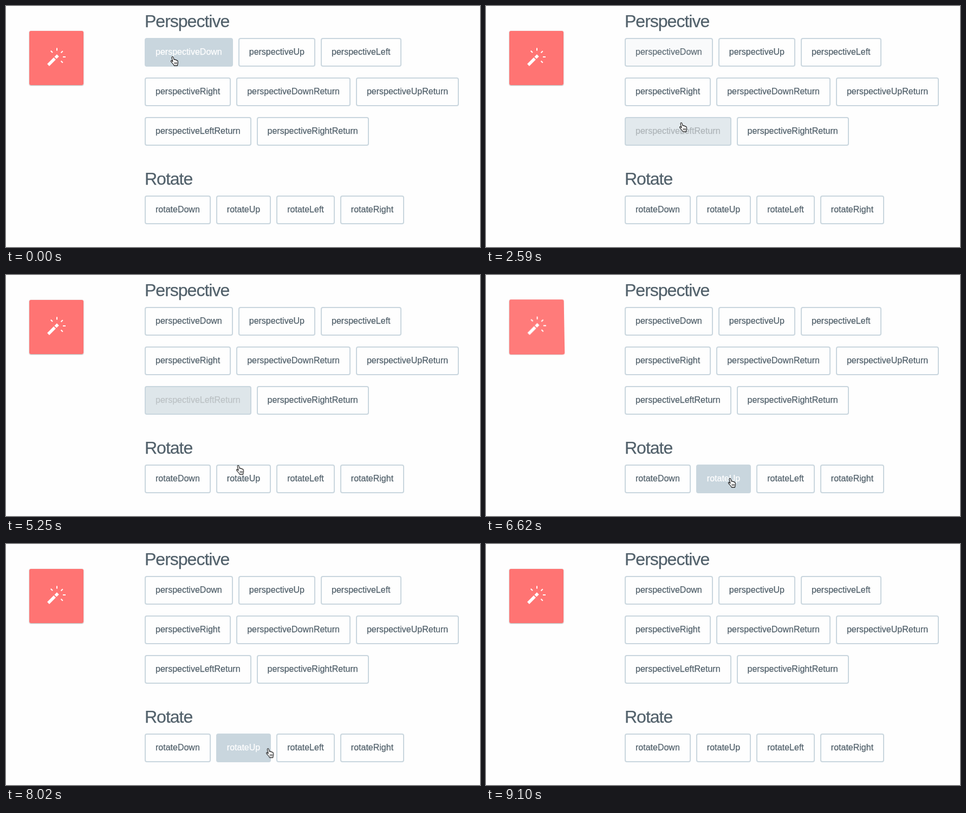
Write an HTML page that moves like this. It is 875x445 px and loops after 9880 ms.

```html
<!DOCTYPE html>
<html lang="en">
<head>
<meta charset="utf-8">
<title>CSS animation effects</title>
<style>
  :root { --loop: 9880ms; --ink: #52616b; --line: #c9d6de; --paper: #fefefe; }
  html, body { margin: 0; width: 100%; height: 100%; overflow: hidden; background: var(--paper); }
  #stage {
    position: relative; width: 875px; height: 445px; overflow: hidden;
    font-family: "Liberation Sans", Arial, Helvetica, sans-serif;
    color: var(--ink); -webkit-text-stroke: .25px;
  }
  #stage > * { position: absolute; }

  h2 { left: 256px; margin: 0; font-size: 32px; line-height: 32px; font-weight: 400; letter-spacing: -1px; }
  .row { left: 256px; display: flex; gap: 10px; }
  .row span {
    box-sizing: border-box; height: 53px; padding: 0 18px;
    border: 2px solid var(--line); border-radius: 4px;
    font-size: 16px; line-height: 47px; white-space: nowrap;
  }

  #slot {
    left: 43px; top: 46px; width: 100px; height: 100px; border-radius: 3px;
    box-shadow: 0 0 2px rgba(0, 0, 0, .14), 0 1px 2px rgba(0, 0, 0, .28);
  }
  #tile { height: 100%; border-radius: 3px; background: #ff7473; animation: tile var(--loop) infinite; }
  #tile svg { display: block; fill: none; stroke: #fff; stroke-width: 2; }
  #hand { left: 0; top: 0; animation: hand var(--loop) linear infinite; }

  .row [id] { animation: var(--loop) infinite; }
  #down { animation-name: down; }
  #leftReturn { animation-name: leftReturn; }
  #rotUp { animation-name: rotUp; }
  #rotLeft { animation-name: rotLeft; }
  #rotRight { animation-name: rotRight; }

  /* perspectiveDown, perspectiveLeftReturn, then rotateUp: one second each */
  @keyframes tile {
    0%, 5.2% { transform-origin: 0 100%; transform: perspective(800px) rotateX(0deg); animation-timing-function: ease; }
    15.3%, 20.34% { transform-origin: 0 100%; transform: perspective(800px) rotateX(-180deg); }
    20.341%, 32.1% { transform-origin: 0 0; transform: none; }
    32.101% { transform-origin: 0 0; transform: perspective(800px) rotateY(-180deg); animation-timing-function: ease; }
    42.2% { transform-origin: 0 0; transform: perspective(800px) rotateY(0deg); }
    66.37% {
      opacity: 1; transform-origin: 0 0;
      transform: perspective(800px) rotateX(0deg) translateZ(0px); animation-timing-function: ease;
    }
    76.5%, 81.16% {
      opacity: 0; transform-origin: 50% 0;
      transform: perspective(800px) rotateX(180deg) translateZ(100px);
    }
    81.17%, 100% { opacity: 1; transform-origin: 0 0; transform: none; }
  }

  @keyframes down {
    0%, 24.3% { background: var(--line); color: #fff; }
    27.3%, 100% { background: var(--paper); color: var(--ink); }
  }
  @keyframes leftReturn {
    0%, 25.3%, 55.5%, 100% { background: var(--paper); color: var(--ink); }
    28.3%, 52.4% { background: var(--line); color: #fff; }
  }
  @keyframes rotUp {
    0%, 53.2%, 84.7%, 100% { background: var(--paper); color: var(--ink); }
    56.3%, 81.7% { background: var(--line); color: #fff; }
  }
  @keyframes rotLeft {
    0%, 82.1%, 88%, 100% { background: var(--paper); color: var(--ink); }
    85%, 85.1% { background: var(--line); color: #fff; }
  }
  @keyframes rotRight {
    0%, 85.3%, 92.1%, 100% { background: var(--paper); color: var(--ink); }
    88.4%, 89.1% { background: var(--line); color: #fff; }
  }

  @keyframes hand {
    0%, 23.7% { transform: translate(302px, 92px); }
    26.7%, 50.8% { transform: translate(365px, 237px); }
    53.14% { transform: translate(423px, 350px); }
    55.2%, 77.9% { transform: translate(445px, 374px); }
    81.1% { transform: translate(476px, 376px); }
    89% { transform: translate(690px, 397px); }
    91.8%, 100% { transform: translate(737px, 446px); }
  }
</style>
</head>
<body>
<div id="stage">
  <div id="slot">
    <div id="tile">
      <svg width="100" height="100">
        <path stroke-width="5.5" d="M35 63L47 51M48.4 49.6L52.8 45.2"/>
        <path d="M51 36.5V31.5M62 48H67M58.5 40.5L61.8 37.2M43 40L39.7 36.7M58.5 55.5L61.8 58.8"/>
      </svg>
    </div>
  </div>

  <h2 style="top:12px">Perspective</h2>
  <div class="row" style="top:59px">
    <span id="down">perspectiveDown</span><span>perspectiveUp</span><span>perspectiveLeft</span>
  </div>
  <div class="row" style="top:132px">
    <span>perspectiveRight</span><span>perspectiveDownReturn</span><span>perspectiveUpReturn</span>
  </div>
  <div class="row" style="top:205px">
    <span id="leftReturn">perspectiveLeftReturn</span><span>perspectiveRightReturn</span>
  </div>

  <h2 style="top:303px">Rotate</h2>
  <div class="row" style="top:350px">
    <span>rotateDown</span><span id="rotUp">rotateUp</span><span id="rotLeft">rotateLeft</span><span id="rotRight">rotateRight</span>
  </div>

  <svg id="hand" width="18" height="20" viewBox="0 0 17 19">
    <path fill="#fff" stroke="#000" stroke-linejoin="round"
      d="M5.6 10.4L3.9 3.6C3.4 1.2 5.8.7 6.5 2.8L7.7 6.8C8.3 5.7 9.8 6 10 7.4C10.6 6.4 12 6.8 12.2 8.2C13 7.5 14.1 8.2 14.4 9.6C15.2 12.4 14.6 14 13.6 17.2H7.9C7 14.8 5 13.2 3.5 11.4C1.2 9.3 2.4 7.4 4.2 9Z"/>
    <path fill="none" stroke="#000" stroke-width=".8" d="M8.6 11.2L8.9 14.6M10.6 11.2L10.7 14.6M12.5 11.2L12.4 14.6"/>
  </svg>
</div>
</body>
</html>
```
